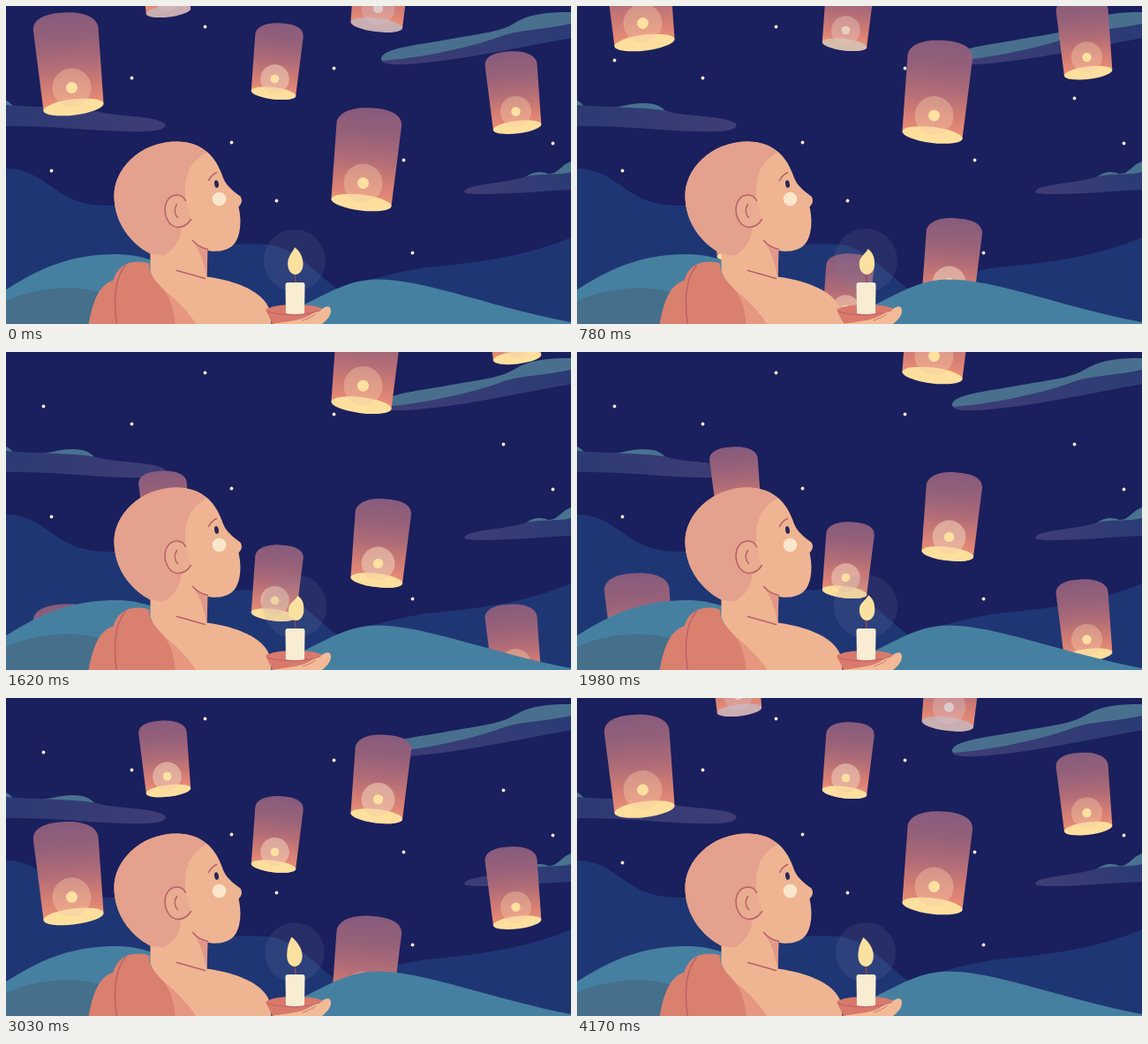
These frames come from a looping animation (640x360 px, 4.23 s). An HTML page:

```html
<!DOCTYPE html>
<html lang="en">
<head>
<meta charset="utf-8">
<title>Sky lanterns</title>
<style>
  html, body { margin: 0; width: 100%; height: 100%; overflow: hidden; background: #1a1f5d; }
  svg { display: block; width: 100vw; height: 100vh; }
</style>
</head>
<body>
<svg viewBox="0 0 640 360" xmlns="http://www.w3.org/2000/svg">
  <defs>
    <linearGradient id="paper" x1="0" y1="0" x2="0.06" y2="1">
      <stop offset="0" stop-color="#865a7c"/>
      <stop offset=".3" stop-color="#96617a"/>
      <stop offset=".55" stop-color="#b06c77"/>
      <stop offset=".75" stop-color="#cd7a74"/>
      <stop offset="1" stop-color="#ee8f76"/>
    </linearGradient>
    <linearGradient id="mist">
      <stop offset="0" stop-color="#2c3a73"/>
      <stop offset="1" stop-color="#3f3d75"/>
    </linearGradient>
    <linearGradient id="mistBack">
      <stop offset="0" stop-color="#3f3d75"/>
      <stop offset="1" stop-color="#2b3b75"/>
    </linearGradient>
  </defs>

  <rect width="640" height="360" fill="#1a1f5d"/>
  <g id="stars" fill="#f6ead9" transform="translate(.5 .5)"></g>

  <!-- far hills -->
  <g fill="#1f3674">
    <path d="M0 184C30 184 45 202 66 214C88 227 110 226 130 226L220 276C250 268 285 268 303 271C330 277 352 303 376 321V360H0Z"/>
    <path d="M350 335C395 311 445 301 475 296C530 291 585 285 640 262V360H350Z"/>
  </g>

  <!-- clouds -->
  <path d="M0 107Q5 109 9 115H0ZM34 115C50 115 60 110 75 110C90 110 96 114 101 120H34Z" fill="#48728e"/>
  <path d="M0 112C35 115 75 114 103 119C122 126 165 123 180 133C184 140 168 143 140 142C90 141 50 135 0 136Z" fill="url(#mist)"/>
  <path d="M425 59C428 47 470 44 505 37C540 31 560 29 575 20C592 9 612 7 640 7V36C580 46 520 60 455 65C434 66 424 64 425 59Z" fill="#48708e"/>
  <path d="M426 62C470 59 520 48 556 36C580 26 610 27 640 20V36C580 47 520 61 455 66C438 67 428 66 426 62Z" fill="url(#mistBack)"/>
  <path d="M588 194C598 187 606 187 614 190C625 191 628 180 640 176V194Z" fill="#48728e"/>
  <path d="M519 210C524 201 560 202 590 193C607 189 625 192 640 188V208C610 209 575 213 540 213C527 213 520 213 519 210Z" fill="url(#mistBack)"/>

  <g id="lanterns" transform="translate(.5 .5)"></g>

  <!-- near hills -->
  <path d="M0 321C35 299 70 281 125 281C165 281 200 300 250 340V360H0Z" fill="#4680a1"/>
  <path d="M0 334C30 320 75 314 108 325L100 360H0Z" fill="#456f8b"/>
  <path d="M318 346C350 336 380 309.5 420 309.5C476 309.5 545 340 640 358V360H318Z" fill="#4680a1"/>

  <circle id="glow" cx="327" cy="288" fill="#7d84a8" opacity=".14"/>

  <!-- monk -->
  <g transform="translate(.5 .5)">
    <path d="M163 262V300L190 360H300L299 346C293 322 258 310 227 306V262Z" fill="#efb592"/>
    <path d="M211 265Q218 275 228 276L227 307Q222 280 211 265Z" fill="#e3988a"/>
    <path d="M163 280C140 268 122 244 122 214C122 185 150 153 193 153C217 153 235 165 244 190C248 203 256 208 265 215C268 220 266 224 263 227C266 240 266 255 260 266C254 276 242 278 232 277C224 276 217 272 211 266L190 284Z" fill="#efb592"/>
    <path d="M163 280C140 268 122 244 122 214C122 185 150 153 193 153C206 153 217 157 227 165C208 176 200 191 203 220L198 250C198 262 192 274 178 282Z" fill="#e4a18d"/>
    <path d="M203 220C199 211 186 211 181 222C177 233 182 249 194 250C201 250 206 246 209 241" fill="#eaac90" stroke="#b8626a" stroke-width="1.6" stroke-linecap="round"/>
    <path d="M193 224C190 229 190 235 194 239M229 197Q232 191 238 188M211 265Q218 273 228 275M193 299Q208 303 225 308" fill="none" stroke="#b8626a" stroke-width="1.6" stroke-linecap="round"/>
    <ellipse cx="238" cy="201" rx="2.4" ry="4.4" fill="#2c2558" transform="rotate(-10 238 201)"/>
    <circle cx="241" cy="218" r="7.8" fill="#fce6cc"/>
    <path d="M162 292C158 305 176 318 188 329C200 340 209 350 215 360H150Z" fill="#e6977f"/>
    <path d="M93 360C97 340 102 316 121 310C124 298 134 289 148 289C157 289 162 290 162 293C160 305 176 316 183 328C189 340 190 350 191 360Z" fill="#d9806f"/>
    <path d="M135 293C122 308 121 335 125 360" fill="none" stroke="#b8626a" stroke-width="1.4"/>
  </g>

  <!-- candle in hand -->
  <path d="M294 344C303 336 352 336 360 344C356 355 342 360 330 360H302Z" fill="#d9796c"/>
  <path d="M296 346Q325 354 356 345" fill="none" stroke="#b8626a" stroke-width="1.2"/>
  <path d="M300 360C320 357 336 356 346 349C351 345 355 347 357 344C361 340 368 338 368 345C368 351 363 356 358 360Z" fill="#f2ba96"/>
  <path d="M336 356Q348 352 351 348" fill="none" stroke="#c9776e"/>
  <path d="M316.5 316Q316.5 313 319 313H336Q338.5 313 338.5 316L338 348Q327 350 317 348Z" fill="#f8edd3"/>
  <path d="M327 301L328 313" stroke="#8f4a5e" stroke-width="1.4"/>
  <path id="flame" fill="#fbe1a0"/>
</svg>

<script>
const LOOP = 4230, TICK = 30, FADE_IN = 300;
const KEY_TIMES = [30, 780, 1200, 1980, 2670, 3450, 4170];
const STEPS = [0, 24, 38, 64, 87, 113, 137];
const FLICKER = 10.07;

// path: height of the light at each key time; gap: distance to the following lantern
const LANTERNS = [
  { x: 74, scale: 1, flip: 1, gap: 438, path: [92, 19, -27, -103, -173, -260, -334.5] },
  { x: 182, scale: .74, flip: 1, gap: 331, dims: true, path: [-11, -67, -102, -161, -213, -277.5, -334] },
  { x: 304, scale: .74, flip: -1, gap: 316, dims: true, path: [82, 27, -5, -61, -115, -174, -226] },
  { x: 421, scale: .86, flip: -1, gap: 376, dims: true, path: [2, -63, -102, -167, -228, -301, -366] },
  { x: 577, scale: .8, flip: 1, gap: 365, path: [119, 57.5, 21, -40, -98, -165, -235.5] },
  { x: 404, scale: 1, flip: -1, gap: 439, path: [200, 123.5, 77, 4, -67, -155, -226] }
];
const STARS = [[225, 23], [142, 81], [371, 70], [255, 154], [51, 186], [306, 220],
  [450, 174], [460, 279], [619, 155], [42, 61], [563, 104]];

const byId = id => document.getElementById(id);
const clamp = v => Math.max(0, Math.min(1, v));

function add(parent, name, attrs) {
  const node = document.createElementNS("http://www.w3.org/2000/svg", name);
  for (const key in attrs) node.setAttribute(key, attrs[key]);
  return parent.appendChild(node);
}

function addLights(parent, rim, core, halo) {
  const group = add(parent, "g", {});
  add(group, "ellipse", { cx: 2, cy: 22, rx: 34.4, ry: 9, fill: rim, transform: "rotate(-7 2 22)" });
  add(group, "circle", { r: 22, fill: halo, opacity: .42 });
  add(group, "circle", { r: 6.5, fill: core });
  return group;
}

function makeLantern(dims) {
  const node = add(byId("lanterns"), "g", {});
  add(node, "path", {
    d: "M-43.5 -64C-45 -78 -30 -84 -10 -85C12 -87 29 -80 30 -68L36 17L-32 26Z",
    fill: "url(#paper)"
  });
  if (dims) addLights(node, "#c9aeb2", "#dccaca", "#d9bcc0");
  return { node, lights: addLights(node, "#ffdf9d", "#ffe0a0", "#f3c9a4") };
}

STARS.forEach(([cx, cy]) => add(byId("stars"), "circle", { cx, cy, r: 1.9 }));
LANTERNS.forEach(l => { l.copies = [makeLantern(l.dims), makeLantern(l.dims)]; });

function sample(values, t) {
  const last = KEY_TIMES.length - 1;
  if (t <= KEY_TIMES[0]) return values[0];
  if (t >= KEY_TIMES[last]) return values[last];
  const i = KEY_TIMES.findIndex(k => k > t) - 1;
  const part = (t - KEY_TIMES[i]) / (KEY_TIMES[i + 1] - KEY_TIMES[i]);
  return values[i] + (values[i + 1] - values[i]) * part;
}

function drawLantern(l, t) {
  const top = sample(l.path, t);
  l.copies.forEach(({ node, lights }, i) => {
    const y = top + i * l.gap;
    node.setAttribute("transform", `translate(${l.x} ${y}) scale(${l.scale * l.flip} ${l.scale})`);
    if (i) node.setAttribute("opacity", clamp((t - KEY_TIMES[0]) / FADE_IN));
    if (l.dims) lights.setAttribute("opacity", clamp((y - 20) / 24));
  });
}

function drawFlame(t) {
  const phase = (sample(STEPS, t) - 24) / FLICKER + .14;
  const sway = Math.cos(phase * 2 * Math.PI);
  const x = 327 + 4 * sway, y = 273 + 3 * sway;
  const c = 327.8 + sway, w = 8.7;
  byId("flame").setAttribute("d",
    `M${x} ${y}C${x + 5} ${y + 4} ${c + w} 283 ${c + w} 292` +
    `C${c + w} 300 ${c + 4} 304 ${c} 304C${c - 5} 304 ${c - w} 299 ${c - w} 292` +
    `C${c - w} 284 ${x - 4} ${y + 7} ${x} ${y}Z`);
  byId("glow").setAttribute("r", 35 + 1.5 * sway);
}

function render(time) {
  const t = Math.floor((time % LOOP) / TICK) * TICK;
  LANTERNS.forEach(l => drawLantern(l, t));
  drawFlame(t);
}

const start = performance.now();
function loop() {
  render(performance.now() - start);
  requestAnimationFrame(loop);
}
loop();
</script>
</body>
</html>
```
